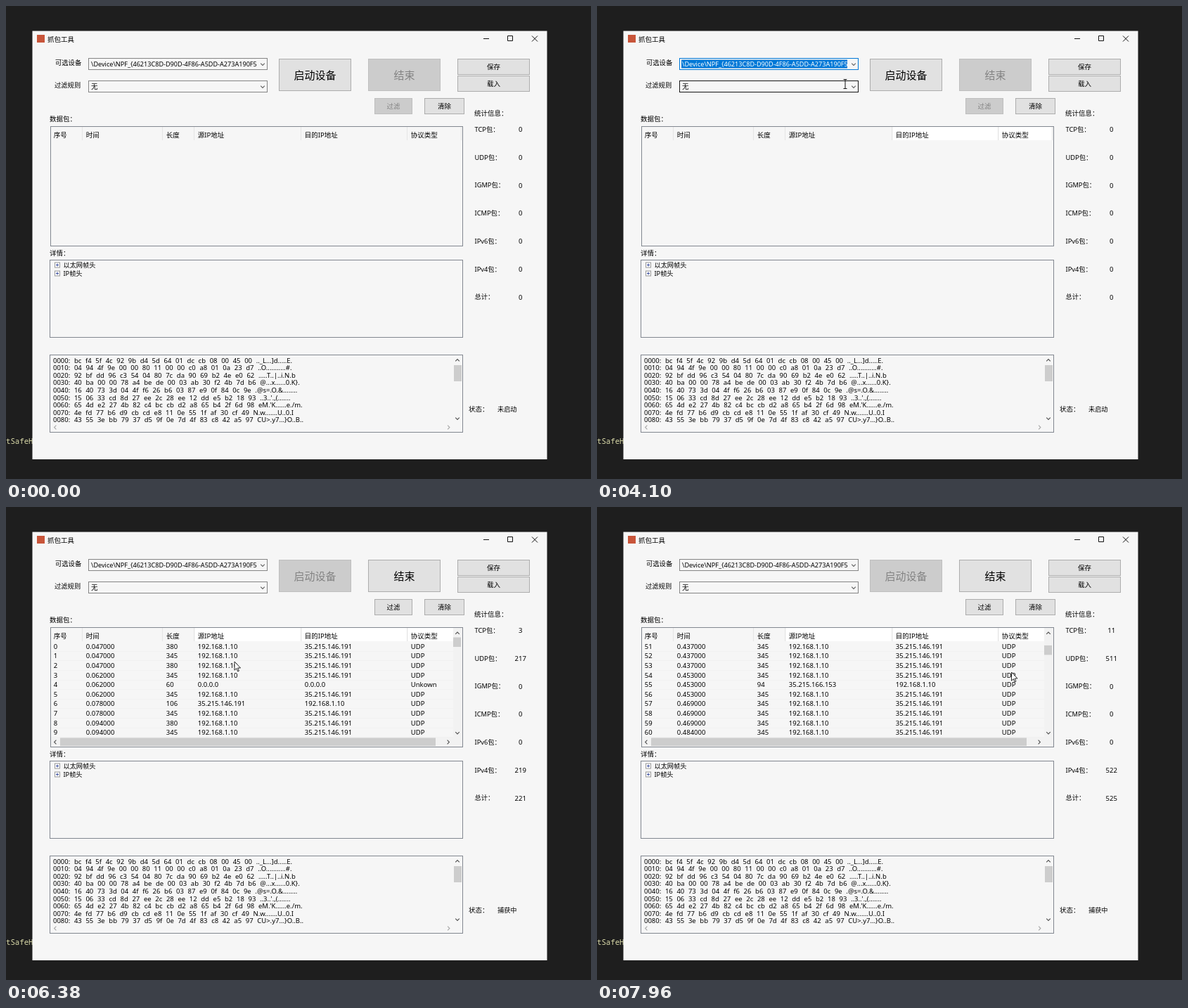
Animation, 832 px wide and 673 px high, one loop 8 s. Source, as an HTML page:

```html
<!DOCTYPE html>
<html lang="zh-CN">
<head>
<meta charset="utf-8">
<title>抓包工具</title>
<style>
  html, body { margin: 0; width: 100%; height: 100%; overflow: hidden; background: #1e1e1e; }
  svg { display: block; }
  text { font-family: "Noto Sans", "Noto Sans CJK SC", "Noto Sans CJK", sans-serif; white-space: pre; }
  .code { font-family: "Noto Sans Mono", monospace; }
  .hex { word-spacing: .35px; }
</style>
</head>
<body>
<svg width="832" height="673" viewBox="0 0 832 673"><g id="base"></g><g id="live"></g></svg>
<script>
const LOOP = 8000, START = 5030, BG = '#f6f6f6', BLUE = '#0078d7', GREY = '#828790';
const $ = id => document.getElementById(id);
const esc = s => String(s).replace(/&/g, '&amp;').replace(/</g, '&lt;');

// Shapes; text is centred vertically on y
const rect = (x, y, w, h, fill, stroke = 'none') =>
  `<rect x="${x}" y="${y}" width="${w}" height="${h}" fill="${fill}" stroke="${stroke}"/>`;
const path = (d, stroke, fill = 'none', width = 1) =>
  `<path d="${d}" fill="${fill}" stroke="${stroke}" stroke-width="${width}"/>`;
const text = (s, x, y, { size = 9.5, fill = '#000', anchor = 'start', cls = '' } = {}) =>
  `<text x="${x}" y="${y + size * .37}" font-size="${size}" fill="${fill}" text-anchor="${anchor}" class="${cls}">${esc(s)}</text>`;
const chevron = (x, y, turn, color = '#505050') =>
  `<path d="M-2.8-1.4L0 1.4 2.8-1.4" transform="translate(${x} ${y}) rotate(${turn})" fill="none" stroke="${color}" stroke-width="1.1"/>`;
// Arrow pairs at the two ends of a scroll bar
const arrowsV = (x, top, bottom) => chevron(x, top, 180) + chevron(x, bottom, 0);
const arrowsH = (y, left, right, color) => chevron(left, y, 90, color) + chevron(right, y, -90, color);

// Key points [time, ...values], advanced in small steps of about 46 ms
function track(keys, t) {
  const i = Math.max(0, keys.findLastIndex(k => k[0] <= t));
  const [from, ...a] = keys[i];
  if (t < from || i === keys.length - 1) return a;
  const [to, ...b] = keys[i + 1];
  const n = Math.round((to - from) / 46);
  const u = Math.floor((t - from) / (to - from) * n) / n;
  return a.map((v, k) => v + (b[k] - v) * u);
}

const POINTER = [
  [520, 490, 664], [1500, 490, 645], [1960, 586, 190], [2290, 400, 130],
  [2670, 373.5, 84], [3330, 305, 111], [3550, 195, 111], [4100, 353, 111],
  [4650, 394, 110], [5080, 440, 102], [5630, 358, 191.5], [6000, 332, 245],
  [6380, 325, 220], [6700, 520, 268], [7230, 609, 235], [7960, 589.5, 235]
];
// time, TCP packets, all packets
const COUNTS = [[5050, 0, 0], [5630, 3, 94], [6380, 3, 221], [7230, 9, 385], [7960, 11, 525]];
const SCROLL = [[6720, 0], [7230, 30], [7960, 51]];

const ME = '192.168.1.10', PEER = '35.215.146.191', HOST = '183.47.99.24';
const UNUSUAL = {
  4: [60, '0.0.0.0', '0.0.0.0', 'Unkown'],
  6: [106, PEER, ME, 'UDP'],
  31: [217, ME, '239.255.255.250', 'UDP'],
  33: [173, ME, HOST, 'TCP'],
  36: [134, HOST, ME, 'TCP'],
  38: [110, PEER, ME, 'UDP'],
  55: [94, '35.215.166.153', ME, 'UDP']
};
function packet(i) {
  const clock = Math.floor(3.21 + .35 * i + (i > 45 ? 7 : 0)) / 64;
  const size = i > 45 || i < 30 && i % 2 ? 345 : i < 30 ? 380 : i < 36 ? 753 : 1084;
  return [i, (Math.ceil(clock * 1000 - .5) / 1000).toFixed(6), ...(UNUSUAL[i] || [size, ME, PEER, 'UDP'])];
}

const COLUMNS = [
  ['序号', 63], ['时间', 109], ['长度', 223], ['源IP地址', 268], ['目的IP地址', 420], ['协议类型', 571]
].map(([label, x], i, all) => ({ label, x, w: (all[i + 1]?.[1] ?? 648) - x }));

const DUMP = `bc f4 5f 4c 92 9b d4 5d 64 01 dc cb 08 00 45 00
04 94 4f 9e 00 00 80 11 00 00 c0 a8 01 0a 23 d7
92 bf dd 96 c3 54 04 80 7c da 90 69 b2 4e e0 62
40 ba 00 00 78 a4 be de 00 03 ab 30 f2 4b 7d b6
16 40 73 3d 04 4f f6 26 b6 03 87 e9 0f 84 0c 9e
15 06 33 cd 8d 27 ee 2c 28 ee 12 dd e5 b2 18 93
65 4d e2 27 4b 82 c4 bc cb d2 a8 65 b4 2f 6d 98
4e fd 77 b6 d9 cb cd e8 11 0e 55 1f af 30 cf 49
43 55 3e bb 79 37 d5 9f 0e 7d 4f 83 c8 42 a5 97`;
function dumpLine(line, i) {
  const bytes = line.split(' ');
  const chars = bytes.map(b => String.fromCharCode(parseInt(b, 16)).replace(/[^ -~]/, '.'));
  return text(`00${i}0:  ${bytes.join('  ')}  ${chars.join('')}`, 67, 504 + i * 10.6, { cls: 'hex' });
}

const treeItem = (s, y) => rect(69.5, y - 3.5, 7, 7, '#fff', '#9a9a9a') +
  path(`M71 ${y}h4M73 ${y - 2}v4`, '#3c50a0') + text(s, 81.5, y + .4, { size: 9.2 });
const stats = (items, x, style) =>
  items.map((s, i) => text(s, x, 175.5 + i * 39.75, style)).join('');

$('base').innerHTML =
  text('tSafeH', 0, 619, { size: 10.7, fill: '#dcdcaa', cls: 'code' }) +
  rect(37.5, 35.5, 732, 609.5, BG) +
  rect(44, 41, 11, 11, '#c8553a') + text('抓包工具', 59, 47) +
  path('M679 46.5h8M713.5 42.5h7v7h-7zM748 42.5l8 8M756 42.5l-8 8', '#111') +
  text('可选设备', 70, 81, { size: 9.3 }) + text('过滤规则', 69, 113, { size: 9.3 }) +
  text('数据包：', 62, 160) + text('详情：', 62, 351) +
  text('统计信息：', 666, 152.5) + text('状态：', 658, 573.5) +
  stats(['TCP包：', 'UDP包：', 'IGMP包：', 'ICMP包：', 'IPv6包：', 'IPv4包：', '总计：'], 666.5, { size: 9.3 }) +
  rect(62.5, 361.5, 587, 110, BG, GREY) +
  treeItem('以太网帧头', 368.5) + treeItem('IP帧头', 380.5) +
  DUMP.split('\n').map(dumpLine).join('') +
  rect(637, 511, 11, 23, '#cdcdcd') +
  arrowsV(642, 504, 587) + arrowsH(599.5, 70, 629.5, '#a8a8a8');

function button(label, x, y, w, h, size, on, hot) {
  const fill = !on ? '#ccc' : hot ? '#e5f1fb' : '#e1e1e1';
  const edge = !on ? '#bfbfbf' : hot ? BLUE : '#adadad';
  return rect(x + .5, y + .5, w - 1, h - 1, fill, edge) +
    text(label, x + w / 2, y + h / 2 + .3, { size, anchor: 'middle', fill: on ? '#000' : '#838383' });
}

function combo(label, y, size, hot, picked) {
  return rect(117.5, y + .5, 254, 16, BG, picked ? BLUE : hot ? '#171717' : '#858585') +
    (picked ? rect(120, y + 2.5, 236, 12, BLUE) : '') +
    text(label, 121, y + 8.5, { size, fill: picked ? '#fff' : '#000' }) +
    chevron(365, y + 9, 0, '#606060');
}

function list(t, total, inside) {
  let s = rect(63.5, 171.5, 586, 170, BG, GREY);
  COLUMNS.forEach(({ label, x, w }, i) => {
    const visited = i > 3 ? t >= 2000 : i === 3 && t >= 5600;
    const fill = inside(x, 172, w, 20) ? '#d9ebf9' : visited ? '#fff' : BG;
    s += rect(x + 1, 172, w - 1, 19, fill) + rect(x + w - 1, 172, 1, 19, '#e5e5e5') +
      text(label, x + 4.8, 183);
  });

  const first = Math.floor(track(SCROLL, t)[0] / 3 + 1e-6) * 3;
  for (let r = 0; r < Math.min(10, total); r++) {
    const y = 198.3 + r * 13.6;
    s += rect(64, Math.round(y + 6.5), 572, 1, '#f1f1f1');
    packet(first + r).forEach((v, c) => s += text(v, COLUMNS[c].x + 4.8, y));
  }
  if (total > 10) {
    const thumb = 185.5 + 115 * first / (total - 10);
    s += rect(636, 172, 13, 156, '#f2f2f2') + rect(64, 328, 585, 13, '#f2f2f2') +
      rect(636, thumb, 11, 13.5, '#cdcdcd') + rect(77, 328.5, 534, 11.5, '#cdcdcd') +
      arrowsV(642, 179.5, 321.5) + arrowsH(334.5, 70, 629);
  }
  return s;
}

function pointer(x, y, beam) {
  if (beam) return path(`M${x - 2.5} ${y - 6.5}h5M${x} ${y - 6.5}v13M${x - 2.5} ${y + 6.5}h5`, '#111');
  return path(`M${x} ${y}v12.2l2.8-2.6 1.9 4.4 1.7-.8-1.8-4.2h3.9z`, '#111', '#fff', .9);
}

function draw(t) {
  const [px, py] = track(POINTER, t);
  const inside = (x, y, w, h) => px >= x && px < x + w && py >= y && py < y + h;
  const shown = t >= 520 && t < 700 || t >= 1500;
  const beam = inside(117, 74, 241, 17) || inside(117, 106, 241, 17);
  const on = t >= START;

  const [tcp, total] = track(COUNTS, t).map(v => Math.floor(v + 1e-6));
  const v4 = Math.max(0, total - 1 - Math.ceil(total / 500));
  const udp = Math.max(0, total - tcp - Math.ceil(total / 225));

  $('live').innerHTML =
    combo('\\Device\\NPF_{46213C8D-D90D-4F86-A5DD-A273A190F5', 74, 9.1,
      inside(117, 74, 255, 17), t >= 3330 && t < START) +
    combo('无', 106, 9.5, inside(117, 106, 255, 17), false) +
    button('启动设备', 388, 75, 103, 46, 15, !on, inside(388, 75, 103, 46)) +
    button('结束', 515, 75, 103, 46, 15, on) +
    button('保存', 642, 75, 103, 23, 9.5, true) +
    button('载入', 642, 99, 103, 23, 9.5, true) +
    button('过滤', 524, 131, 54, 23, 9.5, on) +
    button('清除', 595, 131, 57, 23, 9.5, true) +
    rect(62.5, 496.5, 587, 110, 'none', shown && inside(62, 496, 588, 111) ? '#171717' : GREY) +
    list(t, total, inside) +
    stats([tcp, udp, 0, 0, 0, v4, total], 731.7, { anchor: 'middle' }) +
    text(on ? '捕获中' : '未启动', 699, 573.5, { size: 9.2 }) +
    (shown ? pointer(px, py, beam) : '');
}

function tick() {
  draw(performance.now() % LOOP);
  requestAnimationFrame(tick);
}
tick();
</script>
</body>
</html>
```
